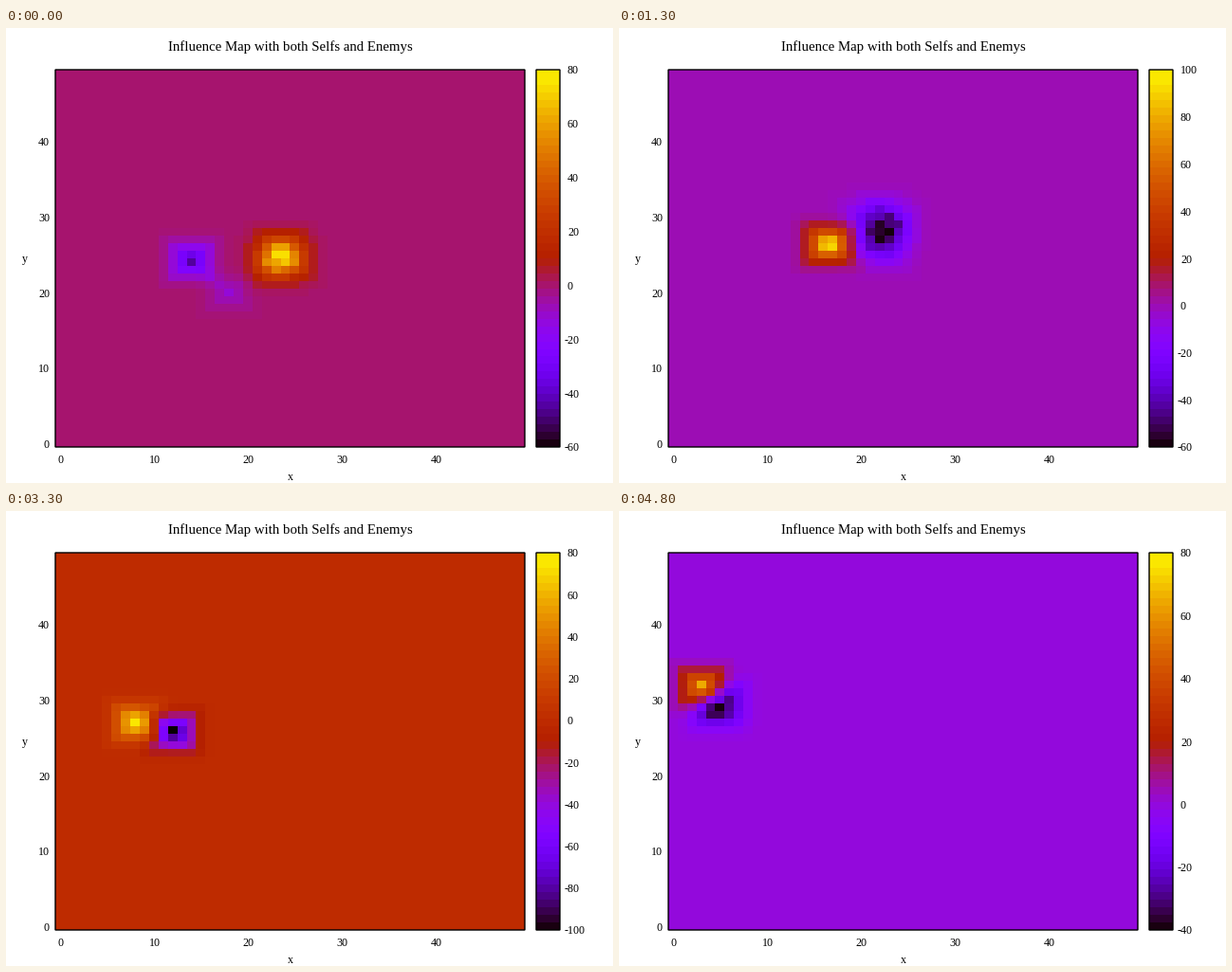
A matplotlib script for the animation above (4900 ms loop, 640 by 480 pixels).

```python
import numpy as np
import matplotlib.pyplot as plt
from matplotlib.animation import FuncAnimation
from matplotlib.patches import Rectangle

W, H, DPI = 640, 480, 100
N, FRAMES, INTERVAL = 50, 49, 100
PX = 72 / DPI
LEFT, RIGHT, TOP, BOTTOM = 52, 547, 44, 442
BAR_L, BAR_R = 559, 584
FRIENDS, FOES = 8, 11
SCOUT, SURROUND = 6, 13  # steps at which the ring is formed, then the pack

# key points: step, then the values at that step
FLOCK = [(0, 23.6, 24.7), (6, 20.6, 27), (13, 16.7, 26.4),
         (27, 11.1, 25.6), (37, 6.2, 27.8), (48, 3.2, 31.6)]
PACK = [(13, 22.1, 28.3, 3.6), (17, 19.6, 27.6, 1.8),
        (27, 15, 24.5, .6), (48, 4.8, 29.2, 1.4)]
HIGH = [(0, 74), (17, 96), (48, 65)]
LOW = [(0, -45), (13, -59), (17, -112), (30, -112), (48, -39)]

# enemies start in two visible groups and meet in pairs around the flock
START = [(14, 24)] * 3 + [(14, 25), (18, 20)]
RING = [(15, 33), (16, 25), (23, 19), (28, 23), (30, 29), (28, 35)]

ROWS, COLS = np.mgrid[0:N, 0:N]


def along(path, k):
    t, *values = zip(*path)
    return [np.interp(k, t, v) for v in values]


def lerp(a, b, u):
    return np.asarray(a) + (np.asarray(b) - a) * np.clip(u, 0, 1)


def disc(i, count):
    """Point i of an even spiral over the unit disc."""
    r, a = np.sqrt((i + .5) / count), 2.4 * i
    return r * np.cos(a), r * np.sin(a)


def friend(i, k):
    x, y = along(FLOCK, k)
    dx, dy = disc(i, FRIENDS)
    spread = .7 + 1.2 * np.exp(-k / 5)
    return x + spread * dx, y + spread * dy


def foe(i, k):
    start = START[i] if i < len(START) else FLOCK[0][1:]
    x, y = RING[i // 2]
    scout = lerp(start, (x, y + i % 2), k / SCOUT)
    px, py, r = along(PACK, k)
    dx, dy = disc(i, FOES)
    pack = px + (.3 + .45 * r) * dx, py + r * dy
    return lerp(scout, pack, (k - SCOUT) / (SURROUND - SCOUT))


def influence(x, y):
    """Square falloff around one unit on a wrapping board."""
    dx = abs((COLS - np.round(x) + N // 2) % N - N // 2)
    dy = abs((ROWS - np.round(y) + N // 2) % N - N // 2)
    return np.clip(1 - np.maximum(dx, dy) / 4, 0, 1) ** 2


def field(k):
    (low,), (high,) = along(LOW, k), along(HIGH, k)
    friends = sum(influence(*friend(i, k)) for i in range(FRIENDS))
    emerge = min(1, k / SCOUT)
    foes = sum((1 if i < len(START) else emerge) * influence(*foe(i, k))
               for i in range(FOES))
    z = 1.1 * (friends / friends.max() * high + foes / foes.max() * low)
    return np.where(z > 0, z * high / z.max(), z * low / z.min()), low, high


def tick_step(span):
    power = 10 ** np.floor(np.log10(span))
    return power * (.1 if span <= power else .2 if span < 2 * power else .5)


def palette(v):
    v = np.clip(v, 0, .968)
    blue = np.clip(np.sin(2 * np.pi * v), 0, 1)
    return np.stack([np.sqrt(v), v ** 3, blue], axis=-1)


plt.rcParams["font.family"] = "Liberation Serif"
fig = plt.figure(figsize=(W / DPI, H / DPI), dpi=DPI, facecolor="white")
ax = fig.add_axes([0, 0, 1, 1])
ax.axis("off")


def label(x, y, s, ha="center", size=12):
    return ax.text(x, y, s, ha=ha, va="baseline", fontsize=size * PX, color="black")


def shade(x0, x1, pixels):
    """Colour grid with a black outline."""
    ax.add_patch(Rectangle((x0, TOP), x1 - x0, BOTTOM - TOP, fill=False,
                           ec="black", lw=1.4 * PX, snap=False, zorder=3))
    return ax.imshow(pixels, origin="lower", aspect="auto",
                     interpolation="nearest", extent=(x0, x1, BOTTOM, TOP))


board = shade(LEFT, RIGHT, np.zeros((N, N, 3)))
shade(BAR_L, BAR_R, palette((np.arange(50) + .5) / 50)[:, None])
ax.set(xlim=(0, W), ylim=(H, 0))

label(299.5, 24, "Influence Map with both Selfs and Enemys", size=14.85)
label(300, 477, "x")
label(20, 247, "y")
for n in range(0, N, 10):
    label(57.5 + n * 9.9, 459, str(n))
    label(46, 443 - n * 7.97, str(n), ha="right")
ticks = [label(0, 0, "", ha="left") for _ in range(16)]


def draw(k):
    z, low, high = field(k)
    step = tick_step(high - low)
    lo, hi = np.floor(low / step) * step, np.ceil(high / step) * step
    board.set_data(palette((z - lo) / (hi - lo)))
    count = int(round((hi - lo) / step)) + 1
    for i, tick in enumerate(ticks):
        value = round(lo + i * step)
        tick.set_text(f"{value:.0f}" if i < count else "")
        y = BOTTOM - (BOTTOM - TOP) * i / (count - 1)
        tick.set_position((589 if value < 0 else 592, y + 4.5))
    return [board, *ticks]


anim = FuncAnimation(fig, draw, frames=FRAMES, interval=INTERVAL,
                     repeat=True, repeat_delay=0, blit=False)
plt.show()
```
